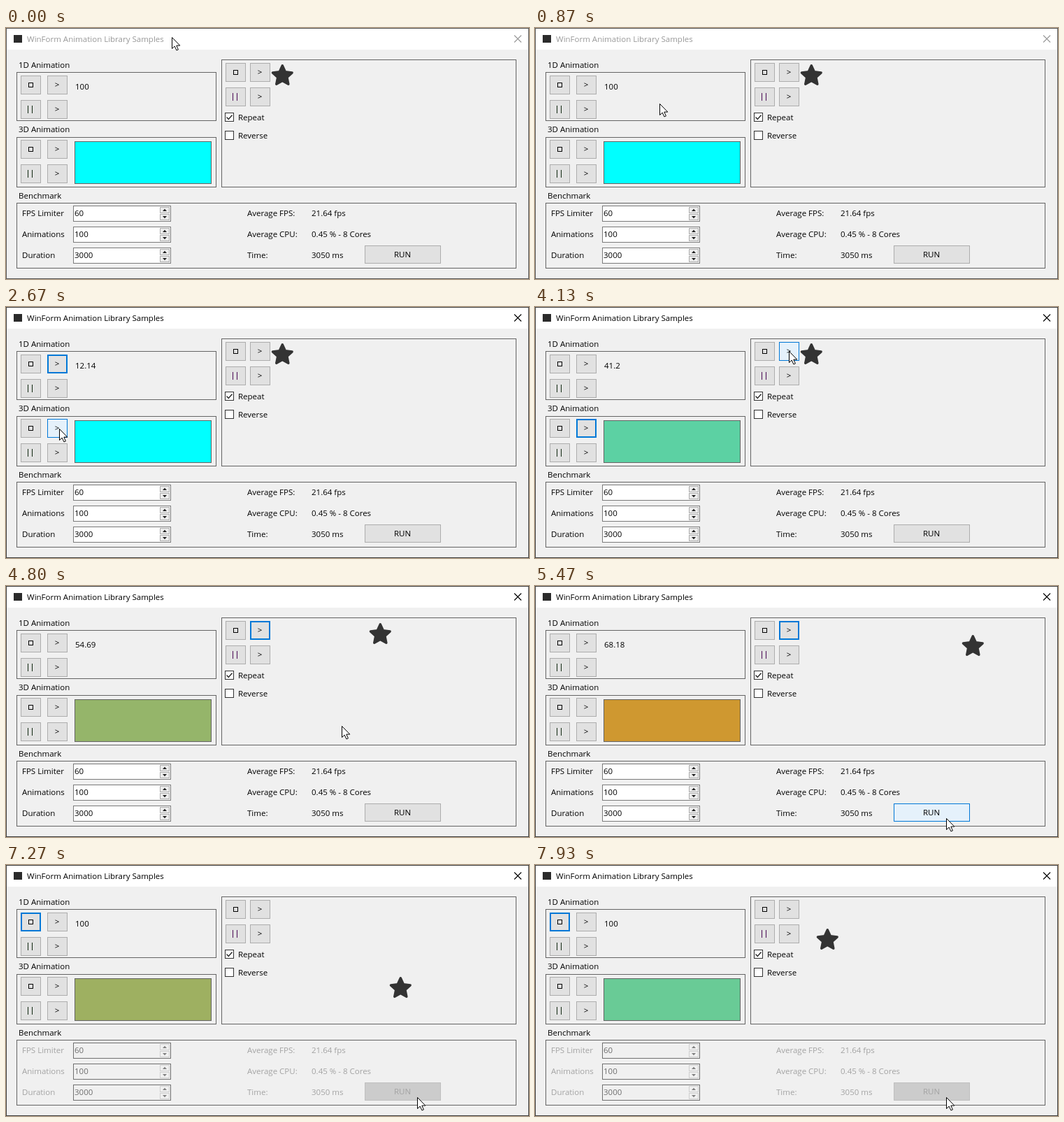
An HTML page with a canvas that plays this animation: 748x359 px, repeating every 8 s.

```html
<!DOCTYPE html>
<html lang="en">
<head>
<meta charset="utf-8">
<title>Animation Library Samples</title>
<style>
html, body { margin: 0; width: 748px; height: 359px; overflow: hidden; background: #f0f0f0; }
canvas { display: block; }
</style>
</head>
<body>
<canvas id="stage" width="748" height="359"></canvas>
<script>
const ctx = document.getElementById('stage').getContext('2d');
const LOOP = 8000;
const FONT = '11.5px "Open Sans", "Noto Sans", sans-serif';
const BLUE = '#0078d7';

// Moments of the mouse presses and releases
const PRESS = { one: 1870, three: 2930, two: 4200, run: 6070 };
const RELEASE = { one: 2060, three: 3040, two: 4330, run: 6200 };

// time, x, y of the pointer tip
const POINTER = [
  [0, 237, 13], [270, 237, 13], [470, 385, 120], [600, 395, 215], [700, 320, 228],
  [870, 178, 108], [1070, 118, 114], [1270, 78, 90], [1400, 75, 84], [2130, 75, 84],
  [2400, 80, 140], [2600, 76, 174], [3130, 76, 174], [3530, 307, 130], [3730, 425, 90],
  [3930, 375, 62], [4060, 363, 63], [4400, 363, 63], [4800, 480, 200], [5070, 596, 343],
  [5270, 588, 332], [8000, 588, 332]
];
const COUNTER = [[2063, 0], [2670, 12.14], [4130, 41.2], [5470, 68.18], [6330, 85.62], [7040, 100]];
const BLEND = [[3040, 0], [4130, 0.36], [5470, 0.81], [6050, 1], [6090, 1], [6330, 0.92], [7930, 0.41], [8000, 0.388]];

function lerpKeys(keys, t) {
  if (t <= keys[0][0]) return keys[0][1];
  for (let i = 1; i < keys.length; i++) {
    const [t0, a] = keys[i - 1], [t1, b] = keys[i];
    if (t <= t1) return a + (b - a) * (t - t0) / (t1 - t0);
  }
  return keys[keys.length - 1][1];
}

function tangent(i, axis) {
  const p = POINTER[i], a = POINTER[i - 1], b = POINTER[i + 1];
  const still = q => !q || (q[1] === p[1] && q[2] === p[2]);
  return still(a) || still(b) ? 0 : (b[axis] - a[axis]) / (b[0] - a[0]);
}

function pointerAt(t) {
  let i = 0;
  while (i < POINTER.length - 2 && t > POINTER[i + 1][0]) i++;
  const a = POINTER[i], b = POINTER[i + 1], d = b[0] - a[0];
  const u = (t - a[0]) / d, u2 = u * u, u3 = u2 * u;
  return [1, 2].map(k => Math.round(
    (2 * u3 - 3 * u2 + 1) * a[k] + (u3 - 2 * u2 + u) * d * tangent(i, k) +
    (3 * u2 - 2 * u3) * b[k] + (u3 - u2) * d * tangent(i + 1, k)));
}

function starAt(t) {
  const p = Math.min(1, Math.max(0, (t - 4320) / 2000));
  if (t < 6320) return [250 * (1 - (1 - p) ** 3), 95 * p ** 3];
  if (t < 7045) return [250, 95 + 46 * (t - 6320) / 725];
  const q = (t - 7045) / 1270;
  return [250 * (1 - q) ** 2, 141 - 199 * q + 75 * q * q];
}

function fill(x, y, w, h, color) {
  ctx.fillStyle = color;
  ctx.fillRect(x, y, w, h);
}

function frame(x, y, w, h, color, line = 1) {
  ctx.strokeStyle = color;
  ctx.lineWidth = line;
  ctx.strokeRect(x + line / 2, y + line / 2, w - line, h - line);
}

function text(s, x, y, color = '#000', align = 'left') {
  ctx.font = FONT;
  ctx.textAlign = align;
  ctx.fillStyle = color;
  ctx.fillText(s, x, y);
}

function polygon(points) {
  ctx.beginPath();
  points.forEach(([x, y]) => ctx.lineTo(x, y));
  ctx.closePath();
}

const STYLES = {
  normal: ['#e1e1e1', '#adadad', 1],
  focus: ['#e1e1e1', BLUE, 2],
  hover: ['#e5f1fb', BLUE, 1],
  down: ['#cce4f7', '#005499', 1],
  off: ['#cccccc', '#bfbfbf', 1]
};

function button(x, y, w, h, state) {
  const [face, edge, line] = STYLES[state];
  fill(x, y, w, h, face);
  frame(x, y, w, h, edge, line);
}

function focusAt(t) {
  if (t >= RELEASE.run) return 'stop';
  return ['run', 'two', 'three', 'one'].find(id => t >= PRESS[id]) || '';
}

function stateOf(id, x, y, w, h, t, [px, py]) {
  if (id === 'run' && t >= RELEASE.run) return 'off';
  if (t >= PRESS[id] && t < RELEASE[id]) return 'down';
  if (px >= x && px < x + w && py >= y && py < y + h) return 'hover';
  return id && focusAt(t) === id ? 'focus' : 'normal';
}

// Four playback buttons: stop, play, pause, resume
function controls(x, y, gap, playId, stopId, barColor, t, mouse) {
  const ids = [stopId, playId, '', ''];
  ids.forEach((id, i) => {
    const bx = x + (i % 2) * gap, by = y + (i > 1 ? 35 : 0);
    button(bx, by, 29, 27, stateOf(id, bx, by, 29, 27, t, mouse));
    if (i === 0) {
      frame(bx + 11, by + 10, 7, 7, '#000');
    } else if (i === 2) {
      fill(bx + 10, by + 8, 1, 11, barColor);
      fill(bx + 16, by + 8, 1, 11, barColor);
    } else {
      text('>', bx + 14, by + 17, '#000', 'center');
    }
  });
}

function checkbox(label, y, checked) {
  fill(313, y, 13, 13, '#fff');
  frame(313, y, 13, 13, '#333');
  if (checked) {
    ctx.strokeStyle = '#222';
    ctx.lineWidth = 1.3;
    ctx.beginPath();
    ctx.moveTo(315.5, y + 6.5);
    ctx.lineTo(318.3, y + 9.5);
    ctx.lineTo(323.5, y + 3.5);
    ctx.stroke();
  }
  text(label, 332, y + 11);
}

function spinner(value, y, off) {
  fill(96, y, 140, 23, off ? '#f0f0f0' : '#fff');
  frame(96, y, 140, 23, off ? '#707070' : '#7a7a7a');
  text(value, 98, y + 15, off ? '#6d6d6d' : '#000');
  [-1, 1].forEach(dir => {
    const by = y + (dir < 0 ? 2 : 12), cy = by + 4.5;
    fill(220, by, 14, 9, off ? '#f0f0f0' : '#ececec');
    frame(220, by, 14, 9, off ? '#cfcfcf' : '#acacac');
    polygon([[224, cy - dir * 1.5], [230, cy - dir * 1.5], [227, cy + dir * 1.8]]);
    ctx.fillStyle = off ? '#808080' : '#202020';
    ctx.fill();
  });
}

function star(dx, dy) {
  const points = [];
  for (let i = 0; i < 10; i++) {
    const r = i % 2 ? 7 : 14.6, a = i * Math.PI / 5;
    points.push([395.3 + dx + r * Math.sin(a), 68.4 + dy - r * Math.cos(a)]);
  }
  polygon(points);
  ctx.fillStyle = ctx.strokeStyle = '#333';
  ctx.lineWidth = 3.4;
  ctx.lineJoin = 'round';
  ctx.fill();
  ctx.stroke();
  ctx.lineJoin = 'miter';
}

function arrow([x, y]) {
  polygon([[0, 0], [0, 16], [3.7, 12.6], [6.4, 18.4], [8.9, 17.4], [6.3, 11.6], [11.3, 11.6]]
    .map(([a, b]) => [x + a + 0.5, y + b + 0.5]));
  ctx.fillStyle = '#fff';
  ctx.strokeStyle = '#000';
  ctx.lineWidth = 1;
  ctx.fill();
  ctx.stroke();
}

function titleBar(active) {
  fill(0, 0, 748, 31, '#fff');
  fill(11, 10, 12, 11, '#2b2b2b');
  text('WinForm Animation Library Samples', 30, 20, active ? '#000' : '#999');
  ctx.strokeStyle = active ? '#000' : '#999';
  ctx.lineWidth = 1.1;
  ctx.beginPath();
  ctx.moveTo(727, 10.5);
  ctx.lineTo(737, 20.5);
  ctx.moveTo(737, 10.5);
  ctx.lineTo(727, 20.5);
  ctx.stroke();
}

function benchmark(t, mouse) {
  const off = t >= RELEASE.run, ink = off ? '#a3a3a3' : '#000';
  const rows = [
    ['FPS Limiter', '60', 'Average FPS:', '21.64 fps'],
    ['Animations', '100', 'Average CPU:', '0.45 % - 8 Cores'],
    ['Duration', '3000', 'Time:', '3050 ms']
  ];
  text('Benchmark', 18, 244);
  frame(15, 250, 715, 94, '#646464');
  rows.forEach(([name, value, label, result], i) => {
    const y = 269 + 30 * i;
    text(name, 23, y, ink);
    spinner(value, y - 15, off);
    text(label, 345, y, ink);
    text(result, 437, y, ink);
  });
  button(513, 311, 109, 26, stateOf('run', 513, 311, 109, 26, t, mouse));
  text('RUN', 567, 328, ink, 'center');
}

function draw(t) {
  const active = t >= PRESS.one, mouse = pointerAt(t);
  fill(0, 0, 748, 359, '#f0f0f0');
  titleBar(active);

  text('1D Animation', 18, 57);
  frame(15, 63, 286, 70, '#646464');
  controls(21, 68, 38, 'one', 'stop', '#102810', t, mouse);
  const count = t < COUNTER[0][0] ? 100 : lerpKeys(COUNTER, t);
  text(String(Math.round(count * 100) / 100), 99, 88);

  text('3D Animation', 18, 149);
  frame(15, 156, 286, 72, '#646464');
  controls(21, 160, 38, 'three', '', '#102810', t, mouse);
  const p = lerpKeys(BLEND, t);
  const [r, g, b] = [255 * p, 255 - 127 * p, 255 * (1 - p)].map(Math.round);
  fill(98, 162, 196, 61, `rgb(${r},${g},${b})`);
  frame(98, 162, 196, 61, '#646464');

  frame(308, 45, 422, 183, '#646464');
  controls(314, 50, 35, 'two', '', '#4b0b55', t, mouse);
  checkbox('Repeat', 121, true);
  checkbox('Reverse', 147, false);
  star(...starAt(t).map(Math.round));

  benchmark(t, mouse);
  frame(0, 0, 748, 359, active ? '#3c3c3c' : '#555');
  arrow(mouse);
}

// The picture advances 15 times a second
function tick(now) {
  const step = Math.floor((now % LOOP) * 0.015 + 0.06);
  draw(Math.min(LOOP, Math.round(step * 100 / 15) * 10));
  requestAnimationFrame(tick);
}
requestAnimationFrame(tick);
</script>
</body>
</html>
```
